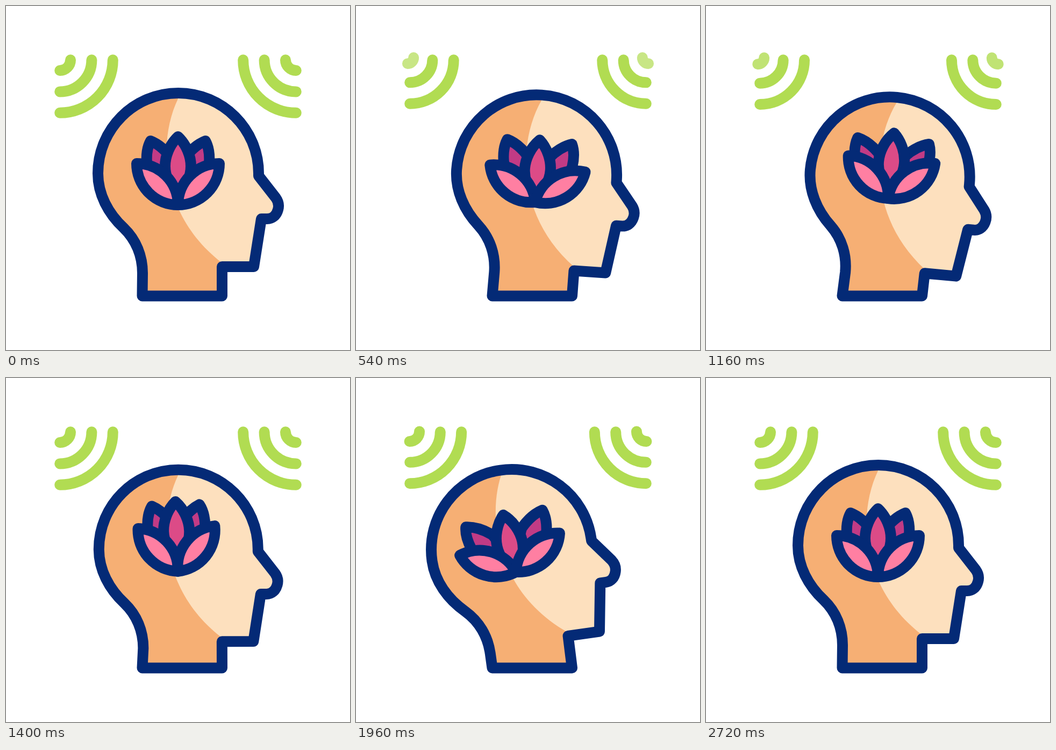
These frames come from a looping animation (640x640 px, 3 s). An HTML page:

```html
<!DOCTYPE html>
<html lang="en">
<head>
<meta charset="utf-8">
<title>Mindful head</title>
<style>
  html, body { margin: 0; width: 100%; height: 100%; overflow: hidden; background: #fff; }
  svg { display: block; width: 100vw; height: 100vh; }
  .line { stroke: #042a76; stroke-width: 20; stroke-linecap: round; stroke-linejoin: round; }
  .wave { fill: none; stroke: #b1dc52; stroke-width: 20; stroke-linecap: round; stroke-linejoin: round; }
</style>
</head>
<body>
<svg viewBox="0 0 640 640">
  <defs>
    <clipPath id="inside"><path class="skull"/></clipPath>
    <path id="back" class="line" fill="#c13b85" d="M-51-119C-57-108-59-92-58-78C-55-55-35-30 0-10C-2-30-4-60-12-86C-22-100-36-113-51-119Z"/>
    <path id="front" class="line" fill="#ff7fa2" d="M-77-77A77 77 0 0 0 0 0A77 77 0 0 0-77-77Z"/>
  </defs>

  <g id="left"></g>
  <g id="right" transform="translate(640) scale(-1 1)"></g>

  <path class="skull" fill="#f6af74"/>
  <path id="light" fill="#fde0be" clip-path="url(#inside)"/>
  <path class="skull line" fill="none"/>

  <g id="lotus">
    <g id="backL"><use href="#back"/></g>
    <g id="backR"><use href="#back" transform="scale(-1 1)"/></g>
    <path id="middle" class="line" fill="#dc4b87" d="M0-127C16-112 24-90 24-72C24-54 16-34 0-20C-16-34-24-54-24-72C-24-90-16-112 0-127Z"/>
    <g id="frontL"><use href="#front"/></g>
    <g id="frontR"><use href="#front" transform="scale(-1 1)"/></g>
  </g>
</svg>
<script>
const LOOP = 3000, START = 200, PULSE = 600, BASE_Y = 539.4;
const RAD = Math.PI / 180;

const SKULL = `M253.5,${BASE_Y} L254,497 C254,465 242,435 219,413 C190,386 171,350 171,311.5 ` +
  'C171,229 238,162 320.5,162 C403,162 470,229 470,311.5 L470,316 L502,357 ' +
  'C507,364 508,372 506,379 C503,390 495,396 486,396 L475,396 L461,485 L402,485 ' +
  `L402,${BASE_Y} Z`;
const LIGHT = 'M325,163 C282,240 281,385 402,478 L402,492 L560,520 L560,120 L330,120 Z';

const byId = id => document.getElementById(id);
const put = (el, name, value) => el.setAttribute(name, value);
const clamp = x => Math.min(1, Math.max(0, x));
const ease = x => x * x * (3 - 2 * x);

// Eased value of a track of [time, value] keys
function track(t, keys) {
  if (t <= keys[0][0]) return keys[0][1];
  for (let i = 1; i < keys.length; i++) {
    const [t0, a] = keys[i - 1], [t1, b] = keys[i];
    if (t < t1) return a + (b - a) * ease((t - t0) / (t1 - t0));
  }
  return keys[keys.length - 1][1];
}

const shift = (x, y, px, py, angle) => {
  const c = Math.cos(angle) - 1, s = Math.sin(angle);
  return [(x - px) * c - (y - py) * s, (x - px) * s + (y - py) * c];
};

// Blend of the right-leaning and left-leaning poses
function lean(x, y, wr, wl) {
  const r = shift(x, y, 293, 545, 8 * RAD), l = shift(x, y, 361.5, 535, -8.25 * RAD);
  return [x + wr * r[0] + wl * l[0], y + wr * r[1] + wl * l[1]];
}

const bend = (d, wr, wl) => d.replace(/([\d.]+),([\d.]+)/g, (pair, x, y) =>
  +y === BASE_Y ? pair : lean(+x, +y, wr, wl).map(v => v.toFixed(2)).join(','));

const skulls = document.querySelectorAll('.skull');
const sides = ['left', 'right'].map(id => [0, 1, 2, 3].map(() => {
  const ring = document.createElementNS('http://www.w3.org/2000/svg', 'path');
  put(ring, 'class', 'wave');
  byId(id).append(ring);
  return ring;
}));

function drawWaves(t) {
  const p = t <= 0 || t >= 4 * PULSE ? 1 : t / PULSE % 1;
  const opacity = [clamp(3 * p - 1), 1, 1, clamp(1 - 3 * p)];
  for (const rings of sides) rings.forEach((ring, i) => {
    const c = i ? 100.2 : 90.4 + 9.8 * p;
    const r = i ? 19.8 + 39.4 * (i - 1 + p) : 19.8 * p;
    put(ring, 'd', `M${c + r} ${c}A${r} ${r} 0 0 1 ${c} ${c + r}`);
    put(ring, 'opacity', opacity[i]);
  });
}

const bloom = (t, open, shut) => track(t, [[0, 0], [600, open], [1200, shut], [1800, open], [2400, 0]]);

function drawHead(wr, wl) {
  const d = bend(SKULL, wr, wl);
  skulls.forEach(el => put(el, 'd', d));
  put(byId('light'), 'd', bend(LIGHT, wr, wl));
}

function drawLotus(t, wr, wl) {
  const front = bloom(t, 16.2, -4), back = bloom(t - 120, 15.2, -5.3);
  const rise = track(t, [[0, 0], [1200, 1], [2400, 0]]);
  const [x, y] = lean(320, 370, wr, wl);
  const dir = 12 * RAD * (wr - wl), up = 18.5 * rise;
  const ox = x + up * Math.sin(dir) + 0.15 * front;
  const oy = y - up * Math.cos(dir) - 0.42 * front;
  put(byId('lotus'), 'transform', `translate(${ox} ${oy}) rotate(${8.8 * wr - 12.8 * wl})`);
  put(byId('middle'), 'transform', `translate(0 ${1.1 * front + 1.5 * rise})`);
  const turn = (id, angle, drop = 0) => put(byId(id), 'transform', `rotate(${angle}) translate(0 ${drop})`);
  turn('backL', -back, 0.4 * back);
  turn('backR', back, 0.4 * back);
  turn('frontL', -front);
  turn('frontR', front);
}

function frame() {
  const t = Math.floor(performance.now() % LOOP / 20) * 20 - START;
  const wr = track(t, [[0, 0], [700, 1], [1700, 0]]);
  const wl = track(t, [[700, 0], [1700, 1], [2400, 0]]);
  drawWaves(t);
  drawHead(wr, wl);
  drawLotus(t, wr, wl);
  requestAnimationFrame(frame);
}
frame();
</script>
</body>
</html>
```
